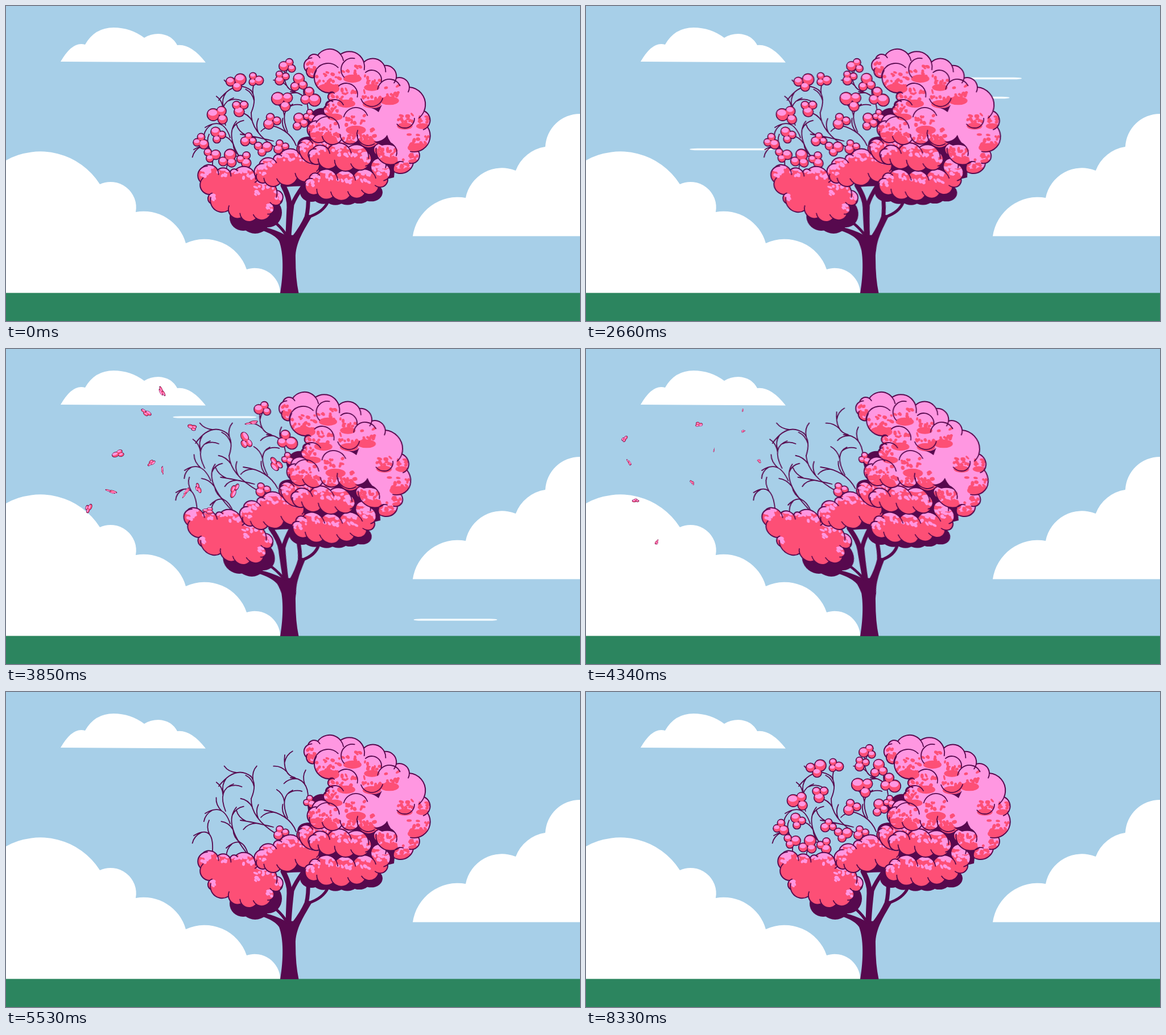
These frames come from a looping animation (1009 px wide and 555 px high, 8.4 s). An HTML page with a canvas:

```html
<!DOCTYPE html>
<html lang="en">
<head>
<meta charset="utf-8">
<title>Tree in the wind</title>
<style>
html, body { margin: 0; width: 100%; height: 100%; overflow: hidden; background: #a7cfe8; }
canvas { display: block; }
</style>
</head>
<body>
<canvas id="stage" width="1009" height="555"></canvas>
<script>
const W = 1009, H = 555, LOOP = 8400, STEP = 70;
const SKY = '#a7cfe8', GRASS = '#2c855f', DARK = '#57094e', PINK = '#ff97e1', RED = '#fd4f76';
const stage = document.getElementById('stage').getContext('2d');

function layer() {
  const c = document.createElement('canvas');
  c.width = W;
  c.height = H;
  const g = c.getContext('2d');
  g.lineCap = g.lineJoin = 'round';
  return g;
}

const clamp = v => Math.max(0, Math.min(1, v));
let seed = 7;
const rand = () => (seed = seed * 16807 % 2147483647) / 2147483647;

function stroke(g, path, width) {
  g.strokeStyle = DARK;
  g.lineWidth = width;
  g.stroke(path);
}

function fill(g, d, color) {
  g.fillStyle = color;
  g.fill(new Path2D(d));
}

function oval(g, color, x, y, rx, ry = rx, turn = 0) {
  g.fillStyle = color;
  g.beginPath();
  g.ellipse(x, y, rx, ry, turn, 0, 7);
  g.fill();
}

function drawScenery(g) {
  fill(g, 'M96 98Q117 61 139 68Q156 38 189 38Q219 38 243 56Q254 49 268 49Q291 50 301 69Q325 66 351 99.5Z', '#fff');
  fill(g, 'M0 272A124 124 0 0 1 165 314A45 45 0 0 1 228 363A77 77 0 0 1 316 418A78 78 0 0 1 423 464A45 45 0 0 1 482 506H0Z', '#fff');
  fill(g, 'M715 405.5A80 80 0 0 1 808 338A65 65 0 0 1 896 290A66 66 0 0 1 948 248A61 61 0 0 1 1009 190V405.5Z', '#fff');
  g.fillStyle = GRASS;
  g.fillRect(0, 505.5, W, 50);
}

// A band of colour on one side of a puff, breaking up into specks
function mottle(g, color, x, y, r, side) {
  oval(g, color, x, y + side * r * .8, r * .8, r * .36);
  for (let i = 0; i < r * .6; i++)
    oval(g, color, x + (rand() * 2 - 1) * r * .85, y + side * r * (rand() * 1.1 - .45),
      2 + rand() * 2.6, 1.6 + rand() * 1.8, rand() * 3);
}

// Scalloped shape through clockwise cusps; each scallop curls on past its cusp.
// Shading lies on the upper (side -1) or lower (side 1) part of the scallops.
function lobe(g, points, base, shade, side, puffs = []) {
  const outline = new Path2D(), curls = new Path2D(), rims = [];
  let [px, py] = points[points.length - 1];
  for (const [x, y] of points) {
    const d = Math.hypot(x - px, y - py), r = d * .62, h = d * .367;
    const nx = (y - py) / d, ny = (px - x) / d, mx = (x + px) / 2, my = (y + py) / 2;
    const cx = mx - nx * h, cy = my - ny * h;
    const end = Math.atan2(y - cy, x - cx);
    outline.arc(cx, cy, r, Math.atan2(py - cy, px - cx), end);
    curls.moveTo(x, y);
    curls.arc(cx, cy, r, end, end + .5);
    if (ny * side > -.3) rims.push([mx - nx * d * .2, my - ny * d * .2, d / 2]);
    [px, py] = [x, y];
  }
  for (const [x, y, r, a] of puffs) {
    curls.moveTo(x + r * Math.cos(a), y + r * Math.sin(a));
    curls.arc(x, y, r, a, a + 2.5);
  }
  g.fillStyle = base;
  g.fill(outline);
  g.save();
  g.clip(outline);
  for (const [x, y, r] of [...rims, ...puffs]) mottle(g, shade, x, y, r, side);
  stroke(g, curls, 1.8);
  g.restore();
  stroke(g, outline, 2);
}

// Curved stem with side shoots that curl away left and right in turn
function stem(g, [x0, y0, cx, cy, x1, y1], turn) {
  const path = new Path2D(`M${x0} ${y0}Q${cx} ${cy} ${x1} ${y1}`);
  for (const t of [.45, .78]) {
    const u = 1 - t;
    const x = u * u * x0 + 2 * u * t * cx + t * t * x1, y = u * u * y0 + 2 * u * t * cy + t * t * y1;
    const a = Math.atan2(u * (cy - y0) + t * (y1 - cy), u * (cx - x0) + t * (x1 - cx)) + turn * .25;
    const b = a + turn * .9;
    path.moveTo(x, y);
    path.quadraticCurveTo(x + 15 * Math.cos(a), y + 15 * Math.sin(a),
      x + 15 * Math.cos(a) + 13 * Math.cos(b), y + 15 * Math.sin(a) + 13 * Math.sin(b));
    turn = -turn;
  }
  stroke(g, path, 1.8);
}

function drawBack(g) {
  fill(g, 'M482 506C488 470 488 435 480 414Q472 402 446 394L452 389Q474 394 490 403L510 404C516 390 524 378 527 366L538 370C526 392 508 416 509 445Q509 480 514.5 506Z', DARK);
  stroke(g, new Path2D('M487 316Q499 338 498 355Q497 375 496 404'), 9);
  stroke(g, new Path2D('M523 316Q508 337 503 350Q500 375 498 404M531 335Q532 355 528 372Q520 390 506 408'), 7);
  stroke(g, new Path2D('M566 345Q557 364 531 372M470 379Q482 388 491 401'), 5);
  // Shadows below and between the lobes
  oval(g, DARK, 417, 373, 24, 23);
  oval(g, DARK, 438, 376, 26, 25);
  oval(g, DARK, 461, 364, 24, 26);
  for (let i = 0; i < 6; i++) oval(g, DARK, 537 + i * 21, 329 + 6 * Math.sin(i * .65), 20, 16);
  fill(g, 'M484 315Q510 302 545 300L548 318Q515 316 490 319ZM512 250Q510 230 534 230L530 200Q540 177 560 180L590 150L690 220L682 302L640 312H530Z', DARK);
  [
    [363, 281, 366, 232, 330, 253], [425, 286, 381, 232, 405, 203], [394, 232, 382, 194, 350, 214],
    [386, 210, 371, 172, 400, 162], [475, 250, 430, 222, 431, 188], [431, 188, 442, 162, 430, 148],
    [431, 149, 404, 128, 374, 166], [470, 238, 433, 229, 412, 226], [510, 246, 498, 214, 454, 208],
    [495, 222, 480, 184, 504, 173], [531, 188, 532, 152, 500, 151], [508, 151, 486, 146, 490, 111],
    [425, 284, 414, 250, 387, 275]
  ].forEach((s, i) => stem(g, s, i % 2 ? -1 : 1));
}

function drawFront(g) {
  blossom(g, 484, 248, 13, 1);
  blossom(g, 534, 193, 11, 3);

  lobe(g, [[342, 310], [346, 284], [372, 289], [394, 293], [404, 288], [437, 295], [441, 308], [476, 325],
    [486, 341], [469, 350], [465, 366], [440, 374], [414, 373], [391, 360], [360, 348], [358, 332]], RED, PINK, -1);
  lobe(g, [[440, 302], [445, 279], [470, 270], [481, 262], [516, 259], [539, 268], [550, 286], [541, 302], [512, 303],
    [482, 312], [456, 311]], RED, PINK, -1);
  lobe(g, [[517, 261], [515, 243], [535, 237], [575, 240], [612, 243], [612, 262], [562, 272]], RED, PINK, -1);
  lobe(g, [[526, 320], [533, 304], [547, 295], [580, 297], [611, 298], [645, 294], [651, 269], [668, 279], [671, 304],
    [655, 319], [631, 330], [605, 334], [575, 336], [548, 331]], RED, PINK, -1);
  lobe(g, [[533, 268], [539, 252], [566, 252], [602, 249], [636, 258], [638, 279], [611, 285], [580, 281],
    [551, 278]], RED, PINK, -1);

  // Crown; the inner puffs are x, y, radius and the angle at which the rim line starts
  lobe(g, [[542, 126], [528, 115], [531, 93], [548, 87], [588, 85], [629, 99], [665, 105], [686, 127], [709, 143],
    [735, 185], [741, 213], [725, 256], [716, 277], [682, 292], [692, 274], [652, 263], [649, 246], [619, 237],
    [590, 235], [560, 238], [534, 229], [538, 204], [562, 192], [562, 176], [571, 167], [567, 156], [575, 152]],
    PINK, RED, 1, [
      [566, 126, 25, 3], [609, 112, 20, 2.4], [643, 130, 17, 4], [598, 156, 20, 4], [643, 157, 20, .3],
      [674, 150, 21, 3.3], [578, 182, 17, 3.3], [615, 201, 22, 3.4], [564, 217, 22, 3.7], [637, 226, 20, 1],
      [669, 258, 18, 4.1], [701, 198, 17, 0]
    ]);
  fill(g, 'M637 178Q652 183 661 174L655 187Q648 181 637 178ZM646 239Q663 239 670 227Q674 242 687 250Q675 242 661 246Z', DARK);
}

// One large and two smaller buds, lit from above
function blossom(g, x, y, r, i) {
  const buds = [0, 1, 2].map(k => {
    const a = i * 2.4 + k * 1.9, size = r * (k ? .42 : .55);
    return [x + Math.cos(a) * r * .55, y + Math.sin(a) * r * .5, size];
  });
  for (const [bx, by, br] of buds) oval(g, DARK, bx, by, br + 1.6);
  for (const [bx, by, br] of buds) {
    oval(g, RED, bx, by, br);
    oval(g, PINK, bx - br * .1, by - br * .35, br * .8, br * .55);
  }
}

// x, y, radius, in the order in which the wind takes them
const blossoms = [
  [361, 262, 14], [468, 203, 15], [514, 136, 16], [343, 238, 14], [374, 193, 18], [404, 134, 17],
  [412, 179, 15], [372, 228, 14], [438, 129, 13], [427, 236, 13], [390, 270, 17], [420, 270, 14],
  [487, 168, 19], [451, 250, 15], [485, 126, 13], [516, 205, 15], [535, 160, 18], [496, 106, 14]
];
const release = i => 3060 + 200 * Math.sqrt(i);
const GONE = 5110, GROW = 6090;

// Height of each streak and the moment it enters
const gusts = [
  [366, 1540], [178, 1563], [252.5, 2236], [161.5, 2449], [127.5, 2460], [198, 2830],
  [36, 3057], [340, 3112], [87.5, 3120], [120, 3483], [477, 3700]
];

const swayKeys = [[1500, 0], [1890, 16], [2660, 22], [3290, 37], [4340, 50], [5180, 0]];

function sway(t) {
  for (let i = 1; i < swayKeys.length; i++) {
    const [t0, a] = swayKeys[i - 1], [t1, b] = swayKeys[i];
    if (t < t1) return a + (b - a) * (1 - Math.cos(Math.PI * clamp((t - t0) / (t1 - t0)))) / 2;
  }
  return 0;
}

const bend = y => y > 430 ? 0 : -Math.sin(Math.min(1, (430 - y) / 354) * Math.PI / 2);

const back = layer(), front = layer(), tree = layer(), scenery = layer();
drawBack(back);
drawFront(front);
drawScenery(scenery);

function drawTree(t) {
  tree.clearRect(0, 0, W, H);
  tree.drawImage(back.canvas, 0, 0);
  blossoms.forEach(([x, y, r], i) => {
    const q = clamp((t - GROW - i * 100) / 480);
    const size = t < release(i) ? 1 : q * (2 - q);
    if (size > 0) blossom(tree, x, y, r * size, i);
  });
  tree.drawImage(front.canvas, 0, 0);

  const amount = sway(t);
  if (!amount) return stage.drawImage(tree.canvas, 0, 0);
  for (let y = 60; y < 430; y++)
    stage.drawImage(tree.canvas, 0, y, W, 1, bend(y) * amount, y, W, 1);
  stage.drawImage(tree.canvas, 0, 430, W, 125, 0, 430, W, 125);
}

function drawGusts(t) {
  for (const [y, start] of gusts) {
    const x = W - (t - start) * 1.95;
    stage.fillStyle = '#f4fbff';
    stage.beginPath();
    stage.roundRect(x, y - 1.8, 147, 3.6, [{ x: 14, y: 1.8 }]);
    stage.fill();
  }
}

function drawPetals(t) {
  blossoms.forEach(([x, y, r], i) => {
    const age = t - release(i);
    if (age < 0 || t > GONE) return;
    const size = (1 - clamp(age / 300) * (.3 + .03 * i)) * clamp((GONE - t) / 500);
    stage.save();
    stage.translate(x + bend(y) * sway(release(i)) - .25 * age - .0003 * age * age,
      y + Math.sin(i * 2.4) * .12 * age);
    stage.rotate(i * 1.1 + age * .004);
    stage.scale(size, size * (.2 + .5 * Math.abs(Math.cos(i + age * .006))));
    blossom(stage, 0, 0, r, i);
    stage.restore();
  });
}

function frame(now) {
  const t = Math.floor(now % LOOP / STEP) * STEP;
  stage.fillStyle = SKY;
  stage.fillRect(0, 0, W, H);
  drawGusts(t);
  stage.drawImage(scenery.canvas, 0, 0);
  drawTree(t);
  drawPetals(t);
  requestAnimationFrame(frame);
}
requestAnimationFrame(frame);
</script>
</body>
</html>
```
